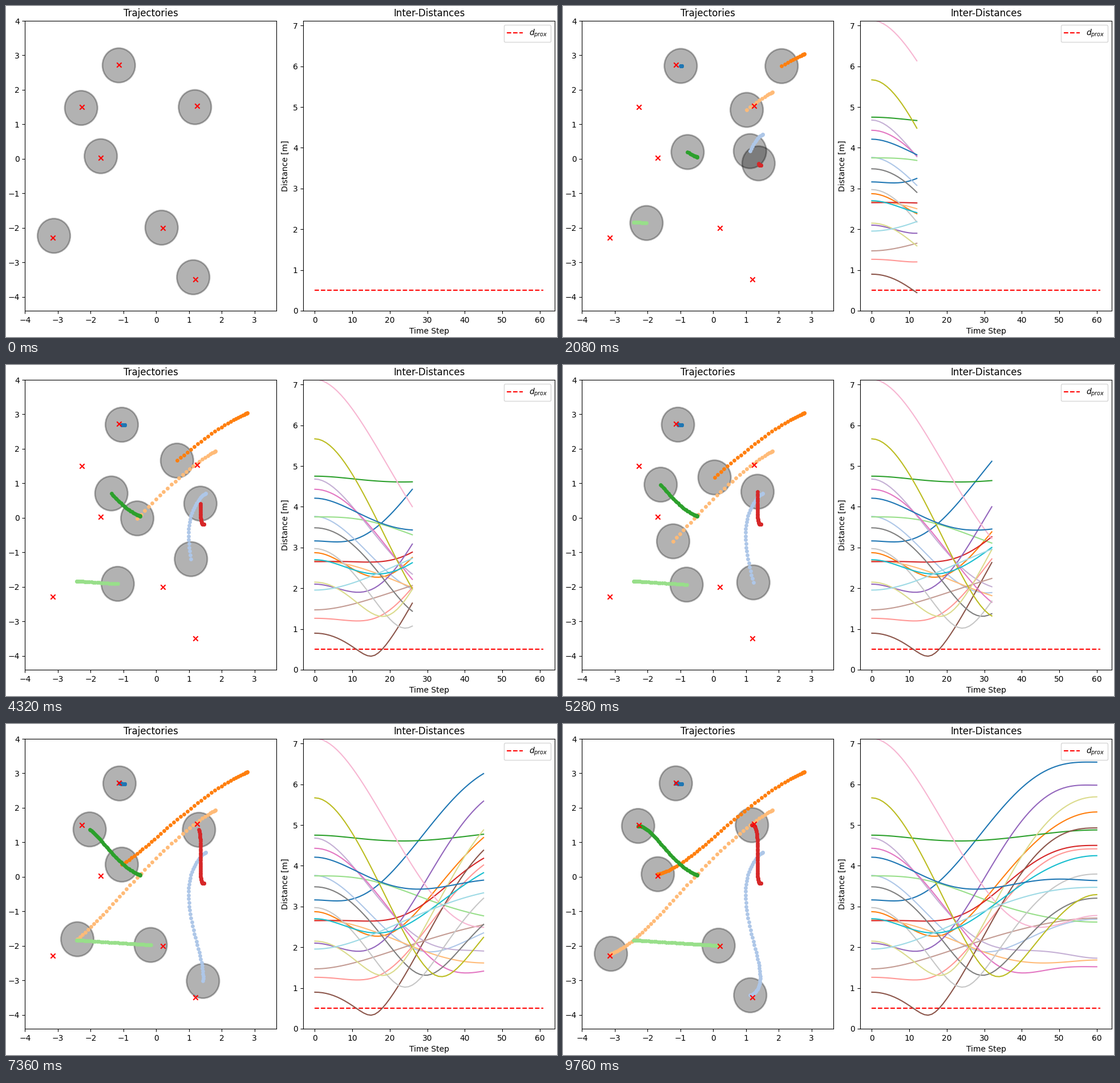
Animation of 966 by 580 pixels, one loop 9.92 s. Source, as a matplotlib script:

```python
from itertools import combinations

import matplotlib.pyplot as plt
import numpy as np
from matplotlib.animation import FuncAnimation
from matplotlib.patches import Circle

W, H, DPI = 966, 580, 100
STEPS, ARRIVAL = 62, 60
RADIUS, D_PROX = 0.5, 0.5

# per agent: start, two control points that bend the path, end
AGENTS = np.array([
    [(-0.965, 2.69), (-1.05, 2.70), (-1.10, 2.705), (-1.14, 2.71)],
    [(1.505, 0.715), (-0.69, -0.60), (2.84, -3.05), (1.13, -3.43)],
    [(2.783, 3.04), (0.27, 2.11), (-0.18, 0.28), (-1.69, 0.078)],
    [(1.809, 1.94), (-1.07, 0.46), (-1.386, -1.766), (-3.12, -2.23)],
    [(-0.489, 0.053), (-1.563, 0.34), (-1.653, 1.556), (-2.29, 1.476)],
    [(-2.421, -1.834), (-1.09, -1.92), (-0.53, -1.95), (0.164, -1.993)],
    [(1.452, -0.18), (1.073, -0.48), (1.67, 1.743), (1.182, 1.50)],
])
GOALS = [(-1.14, 2.72), (1.19, -3.49), (-1.70, 0.03), (-3.15, -2.29),
         (-2.275, 1.495), (0.20, -2.0), (1.25, 1.53)]


def glide(start, a, b, end):
    """Quintic Bezier with doubled end points, so it starts and ends at rest."""
    u = np.clip(np.arange(STEPS) / ARRIVAL, 0, 1)[:, None]
    v = 1 - u
    return (start * v ** 4 * (v + 5 * u) + 10 * a * u ** 2 * v ** 3
            + 10 * b * u ** 3 * v ** 2 + end * u ** 4 * (u + 5 * v))


def add_axes(left, title):
    ax = fig.add_axes([left / W, 46.1 / H, 441 / W, 507.9 / H])
    ax.set_title(title)
    return ax


def color(i):
    return plt.cm.tab20(i % 20)


paths = [glide(*agent) for agent in AGENTS]
gaps = [np.hypot(*(p - q).T) for p, q in combinations(paths, 2)]

fig = plt.figure(figsize=(W / DPI, H / DPI), dpi=DPI, facecolor="white")

ax = add_axes(33.4, "Trajectories")
ax.set_xlim(-4, 3.672)
ax.set_ylim(-4.4, 4)
ax.set_xticks(range(-4, 4))
ax.set_yticks(range(-4, 5))
discs = [ax.add_patch(Circle(p[-1], RADIUS, color="k", alpha=0.3, lw=2))
         for p in paths]
trails = [ax.scatter([], [], s=15, color=color(i), zorder=2)
          for i in range(len(paths))]
ax.scatter(*zip(*GOALS), marker="x", color="r", zorder=3)

bx = add_axes(521.4, "Inter-Distances")
bx.set_xlim(-3.05, 64.05)
bx.set_ylim(0, 7.118)
bx.set_xlabel("Time Step")
bx.set_ylabel("Distance [m]")
bx.plot([0, STEPS - 1], [D_PROX] * 2, "r--", label="$d_{prox}$")
curves = [bx.plot([], [], color=color(i))[0] for i in range(len(gaps))]
bx.legend(loc="upper right")


def draw(n):
    # the discs rest at the end of their paths before the run begins
    for disc, trail, p in zip(discs, trails, paths):
        disc.center = p[n - 1]
        trail.set_offsets(p[:n])
    for curve, gap in zip(curves, gaps):
        curve.set_data(range(n), gap[:n])
    return discs + trails + curves


anim = FuncAnimation(fig, draw, frames=STEPS, interval=160, repeat=True,
                     repeat_delay=0)
plt.show()
```
